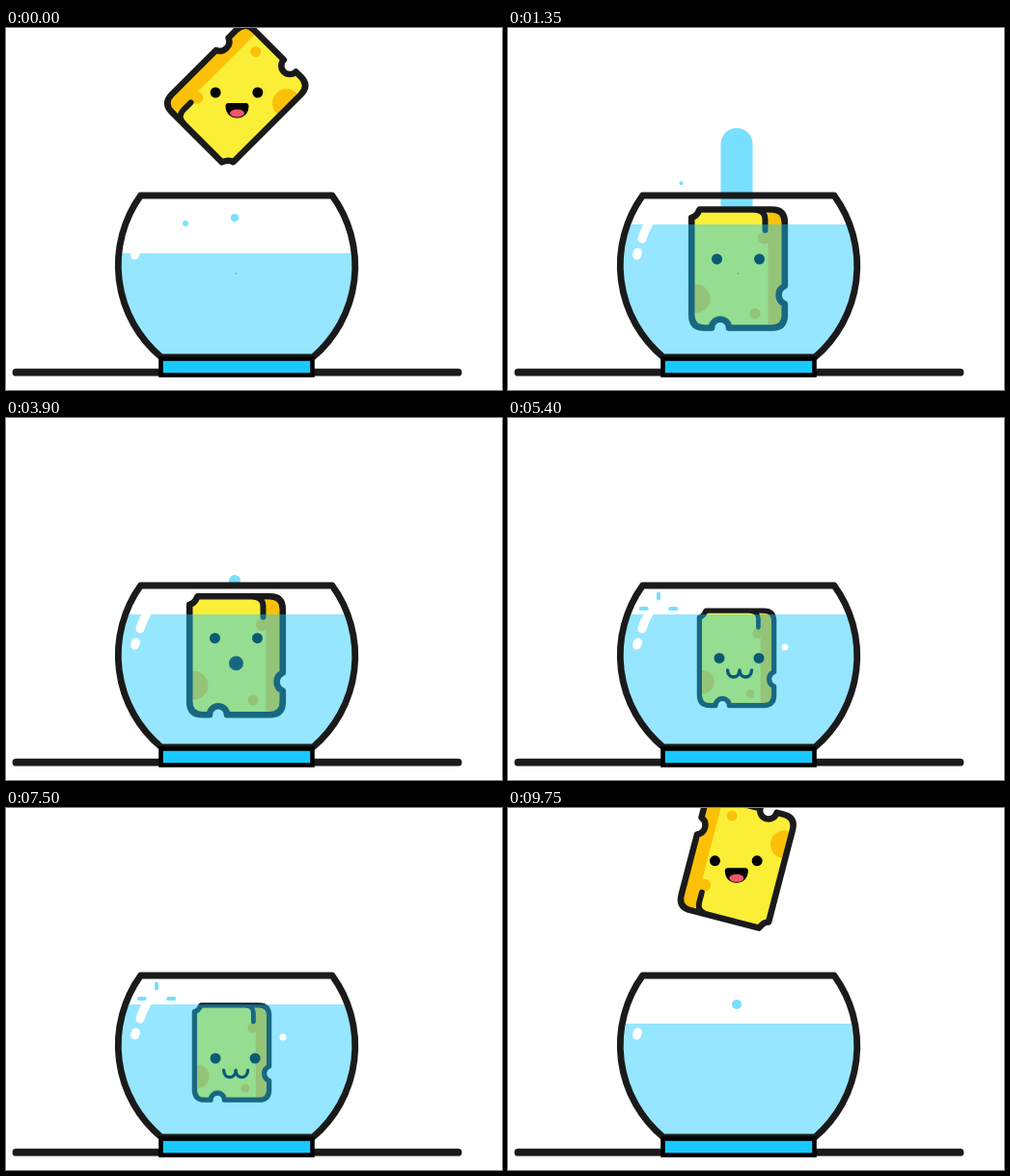
Animation of 514 by 376 pixels, one loop 9900 ms. Source, as an HTML page with a canvas:

```html
<!DOCTYPE html>
<html lang="en">
<head>
<meta charset="utf-8">
<title>Cheese in a bowl</title>
<style>
html, body { margin: 0; width: 100%; height: 100%; overflow: hidden; background: #fff; }
canvas { display: block; width: 514px; height: 376px; }
</style>
</head>
<body>
<canvas id="stage" width="514" height="376"></canvas>
<script>
const ctx = document.getElementById('stage').getContext('2d');
const LOOP = 9900, STEP = 150, TAU = Math.PI * 2;
const SPLASH = 900, CALM = 4650, LEAP = 7880, APEX = 9490;
const INK = '#1a1a1a', YELLOW = '#fbee36', ORANGE = '#fbc108', DROP = '#78dfff', AQUA = '#18c8ff';

const mix = (a, b, p) => a + (b - a) * p;
const ramp = (t, a, b) => Math.min(1, Math.max(0, (t - a) / (b - a)));
const ease = (t, a, b) => (1 - Math.cos(Math.PI * ramp(t, a, b))) / 2;

// value at t on straight lines through [time, value] points
function along(points, t) {
  return points.slice(1).reduce((v, [t1, v1], i) => mix(v, v1, ramp(t, points[i][0], t1)), points[0][1]);
}

// the story runs from the splash at 900 ms, through the leap, to the next splash at 10800 ms
function cheeseY(t) {
  const s = (t - SPLASH) / 1000;
  if (t < CALM) return 250 + 22 * Math.exp(-0.4 * s) * Math.cos(TAU * s / 1.8);
  if (t < LEAP) return 251.7 - 2.3 * Math.cos(TAU * (t - 5400) / 1400);
  if (t < APEX) return mix(252, 48, ease(t, LEAP, APEX));
  return 48 + 125 * ((t - APEX) / 1000) ** 2;
}
const cheeseX = t => along([[4500, 238.5], [5400, 237], [7500, 234], [8700, 238], [9750, 237.3], [9900, 238.7]], t);
const faceX = t => along([[4500, 238.5], [5400, 239.5], [8700, 236.5], [9750, 236.3], [9900, 239]], t);
const faceLift = t => along([[1350, 10], [3900, 18], [5400, 0], [7500, -6], [8700, -1], [9900, 2], [10800, 8]], t);
const turn = t => 90 * ease(t, 8100, 8700) + 270 * ramp(t, 9235, 10565);
const size = t => 1 - 0.2 * ease(t, 4200, 5250) + 0.18 * ease(t, 8100, 9000);
const waterY = t => 204 + 30 * (ramp(t, 9450, 9900) - ramp(t, 10200, 10500));

function disc(x, y, r, fill) {
  if (r <= 0) return;
  ctx.fillStyle = fill;
  ctx.beginPath();
  ctx.arc(x, y, r, 0, TAU);
  ctx.fill();
}

function line(d, width, color) {
  ctx.lineWidth = width;
  ctx.strokeStyle = color;
  ctx.lineCap = ctx.lineJoin = 'round';
  ctx.stroke(new Path2D(d));
}

const body = new Path2D(
  'M-40 -61.5 H35 Q48.3 -61.5 48.3 -48 V18 A10 10 0 0 0 48.3 36.5 V48 Q48.3 61.5 35 61.5' +
  'H-9.5 A9 9 0 0 0 -27.5 61.5 H-35 Q-48.3 61.5 -48.3 48 V-53 Q-43 -54 -40 -61.5 Z');
const smile = new Path2D('M-9 -7.5 H9 Q12 -7.5 12 -4.5 C12 4 6 8 0 8 S-12 4 -12 -4.5 Q-12 -7.5 -9 -7.5 Z');
const bowlPath = 'M139.5 174 H338 A124.5 124.5 0 0 1 318 342 H161 A124.5 124.5 0 0 1 139.5 174 Z';
const bowl = new Path2D(bowlPath);

function drawCheese(t) {
  ctx.save();
  ctx.translate(cheeseX(t), cheeseY(t));
  ctx.rotate(turn(t) * Math.PI / 180);
  ctx.scale(size(t), size(t));
  ctx.save();
  ctx.clip(body);
  ctx.fillStyle = YELLOW;
  ctx.fillRect(-60, -70, 120, 140);
  ctx.fillStyle = ORANGE;
  ctx.fillRect(31, -70, 30, 140);
  disc(27, -32, 6.5, ORANGE);
  disc(17.5, 46.5, 5.5, ORANGE);
  disc(-44, 31, 15, ORANGE);
  ctx.restore();
  line('M19 -61 Q28 -60 28 -51 V-40', 6, INK);
  ctx.lineWidth = 6.6;
  ctx.stroke(body);
  ctx.restore();
}

function drawFace(t) {
  const gap = 22 - 7.5 * (1 - size(t));
  ctx.save();
  ctx.translate(faceX(t), cheeseY(t) - faceLift(t));
  disc(-gap, 0, 5.5, '#000');
  disc(gap, 0, 5.5, '#000');
  if (t >= 8250 && t <= 10500) {
    ctx.translate(0.5, 15 + 3.5 * ramp(t, 9750, 9900));
    ctx.fillStyle = '#000';
    ctx.fill(smile);
    ctx.fillStyle = '#f0566a';
    ctx.beginPath();
    ctx.ellipse(0, 3, 7.5, 4, 0, 0, TAU);
    ctx.fill();
  } else if (t >= CALM && t < 8250) {
    ctx.translate(0.5, 16);
    line('M-12.5 -3.5 C-12 6 -0.5 6 0 -3.5 C0.5 6 12 6 12.5 -3.5', 3.4, '#000');
  } else {
    disc(0, 26, 7.5 * ease(t, 1950, 2550) * (1 - ease(t, 4350, CALM)), INK);
  }
  ctx.restore();
  if (t < 1950 || t >= LOOP) disc(238.5, 255, 0.6, INK);
}

function drawSplash(t) {
  ctx.save();
  ctx.beginPath();
  ctx.rect(0, 0, 514, waterY(t));
  ctx.clip();
  ctx.fillStyle = DROP;
  if (t < 2250) {
    ctx.beginPath();
    ctx.roundRect(220.5, 62 + 467 * ((t - 1650) / 1000) ** 2, 33, 260, 16.5);
    ctx.fill();
  }
  if (t >= 8400) {
    const w = 96 * (1 - ease(t, 8700, 9300));
    ctx.fillRect(237 - w / 2, cheeseY(t), w, 260);
  }
  // slow drops left by the leap
  const age = t - 9750, side = t < 2550 ? t : t - LOOP;
  if (age >= -300) disc(237, 204 - age * 0.047, 5 - age / 150, DROP);
  if (side >= 0 && side <= 2550) disc(186 - side * 0.0048, 203 - side * 0.031, 3 - side * 0.0007, DROP);
  // last drop thrown up by the bobbing
  if (t >= 2850 && t <= 4050) disc(237, 138 + 31 * ((t - 3400) / 500) ** 2, 6, DROP);
  ctx.restore();
}

// three short rays running outwards
function drawSparkle(x, age) {
  if (age < 0 || age > 300) return;
  const p = (age / 300) ** 3, a = mix(11, 21, p), b = mix(17.5, 24, p);
  for (const [dx, dy] of [[-1, 0], [1, 0], [0, -0.85]]) {
    line(`M${x + dx * a} ${198 + dy * a} L${x + dx * b} ${198 + dy * b}`, 4, DROP);
  }
}

function drawWater(t) {
  ctx.save();
  ctx.clip(bowl);
  ctx.beginPath();
  ctx.rect(100, waterY(t), 280, 145);
  ctx.clip();
  ctx.globalAlpha = 0.45;
  ctx.fillStyle = AQUA;
  ctx.fillRect(100, 100, 280, 260);
  ctx.globalAlpha = 1;
  line('M153 193 Q143 205 139 219', 9, '#fff');
  line('M134.5 233 L133.5 236', 9, '#fff');
  if (t >= 5100 && t < 9450) {
    const rise = (t - 5100) % 2100 - 300;
    disc(287 + rise * 0.0175, 238 - rise * 0.02, 3.5 + rise * 0.00125, '#fff');
  }
  ctx.restore();
}

function draw(t) {
  ctx.fillStyle = '#fff';
  ctx.fillRect(0, 0, 514, 376);
  line('M10.5 357.7 H468.5', 7.8, INK);
  drawSplash(t);
  drawCheese(t);
  drawFace(t);
  drawWater(t);
  if (t >= 5250 && t < 8700) {
    const age = (t - 5250) % 2100;
    drawSparkle(156, age);
    drawSparkle(320, age - 900);
  }
  line(bowlPath, 6.8, INK);
  ctx.fillStyle = AQUA;
  ctx.fillRect(160.5, 343.5, 157, 17);
  ctx.lineJoin = 'miter';
  ctx.lineWidth = 4.6;
  ctx.strokeStyle = '#000';
  ctx.strokeRect(160.5, 343.5, 157, 17);
}

const start = performance.now();
function tick(now) {
  const t = Math.floor(Math.max(0, now - start) % LOOP / STEP) * STEP;
  draw(t < SPLASH ? t + LOOP : t);
  requestAnimationFrame(tick);
}
tick(start);
</script>
</body>
</html>
```
